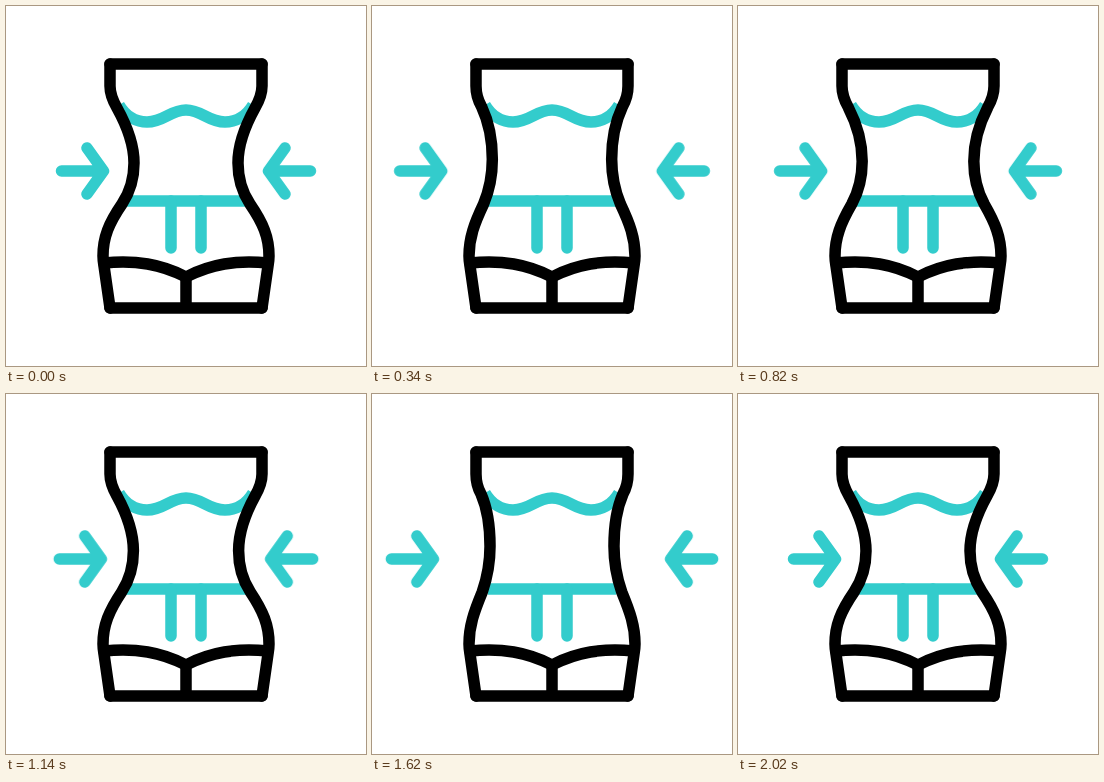
An HTML page for the animation above (2400 ms loop, 360x360 px).

```html
<!DOCTYPE html>
<html lang="en">
<head>
<meta charset="utf-8">
<title>Slim waist</title>
<style>
  html, body { margin: 0; width: 100%; height: 100%; overflow: hidden; background: #fff; }
  svg { display: block; width: 100vw; height: 100vh; }
  path { fill: none; stroke-width: 11.5; stroke-linecap: round; stroke-linejoin: round; }
  .teal { stroke: #33cccc; }
  .ink { stroke: #000; }
  .flat { stroke-linecap: butt; }

  :root {
    --slim: path("M104 58V80C104 88 107 95 111 102C121 120 128 138 128 157C128 174 124 186 116 198C103 217 97 231 97 250C97 254 97.5 257 98 260L104 302");
    --wide: path("M104 58V80C104 88 105 93 109 100C115 114 117.6 134 117.6 152C117.6 172 114 186 110 198C102 218 97 232 97 250C97 254 97.5 257 98 260L104 302");
  }
  .side, .arrow { animation: 2.4s cubic-bezier(.6, 0, .4, 1) infinite; }
  .side { d: var(--slim); animation-name: squeeze; }
  .arrow { animation-name: push; }

  /* 35-540 out, 555-1035 in, 1035-1520 out, 1530-2020 in, then rest */
  @keyframes squeeze {
    0%, 1.458%, 43.125%, 84.167%, 100% { d: var(--slim); }
    22.5%, 23.125%, 63.333%, 63.75% { d: var(--wide); }
  }
  @keyframes push {
    0%, 1.458%, 43.125%, 84.167%, 100% { transform: translateX(0); }
    22.5%, 23.125%, 63.333%, 63.75% { transform: translateX(-37.7px); }
  }
</style>
</head>
<body>
<svg viewBox="0 0 360 360">
  <g class="teal">
    <path class="flat" d="M113 99C120 111 131 116 141 116C158 116 164 104 180 104C196 104 202 116 219 116C229 116 240 111 247 99"/>
    <path class="flat" d="M116 195H244"/>
    <path d="M165 195V242M195 195V242"/>
  </g>
  <g>
    <path class="teal arrow" d="M55.5 165H97M81 142L97.5 165L81 188"/>
    <path class="ink side"/>
  </g>
  <g transform="matrix(-1 0 0 1 360 0)">
    <path class="teal arrow" d="M55.5 165H97M81 142L97.5 165L81 188"/>
    <path class="ink side"/>
  </g>
  <g class="ink">
    <path d="M104 58H256M104 302H256M180 271V302"/>
    <path d="M98 257C130 254 155 258 180 271C205 258 230 254 262 257"/>
  </g>
</svg>
</body>
</html>
```
